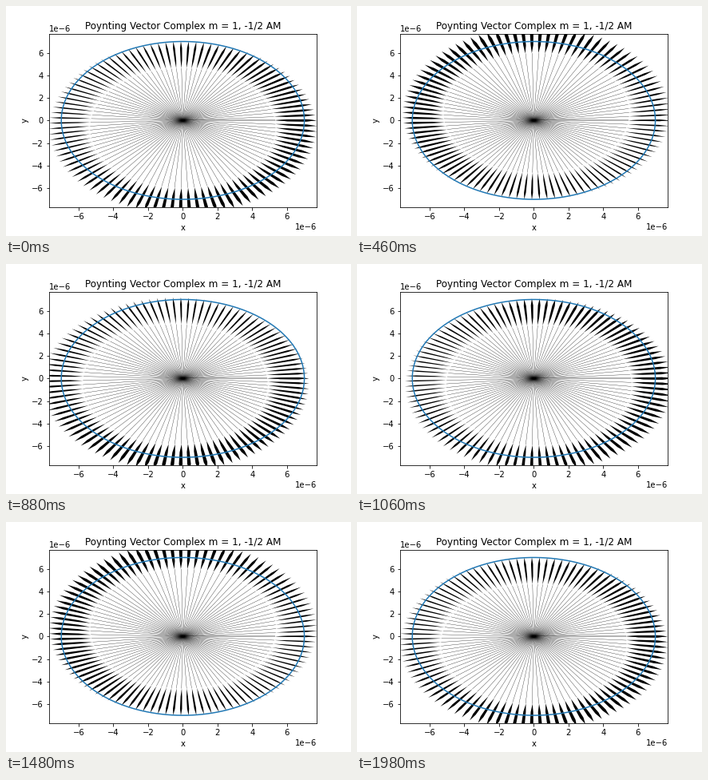
These frames come from a looping animation (432x288 px, 2 s). A matplotlib script:

```python
import numpy as np
import matplotlib.pyplot as plt
from matplotlib.animation import FuncAnimation
from matplotlib.collections import LineCollection, PolyCollection

FRAMES = 100
ARROWS = 100
RADIUS = 7
LIMIT = 7.7
SHAFT, SWING, HEAD = 5.3, 0.68, 2.4

# Head outline: fraction of head length, fraction of half width
ALONG = np.array([0, 0.3, 0.75, 1, 0.75, 0.3])
ACROSS = np.array([0.2, 0.75, 1, 0, -1, -0.75])

plt.rcParams["font.family"] = "DejaVu Sans"
fig, ax = plt.subplots(figsize=(6, 4), dpi=72)
fig.subplots_adjust(left=0.125, right=0.9, bottom=0.125, top=0.88)

theta = np.linspace(0, 2 * np.pi, ARROWS)
radial = np.column_stack([np.cos(theta), np.sin(theta)])
normal = np.column_stack([-np.sin(theta), np.cos(theta)])

shafts = LineCollection([], colors="black", linewidths=0.32, zorder=1)
heads = PolyCollection([], facecolors="black", linewidths=0, zorder=1)
ax.add_collection(shafts, autolim=False)
ax.add_collection(heads, autolim=False)

circle = np.linspace(0, 2 * np.pi, 300)
ax.plot(RADIUS * np.cos(circle), RADIUS * np.sin(circle), color="C0", lw=1.5)

ticks = np.arange(-6, 7, 2)
ax.set(xlim=(-LIMIT, LIMIT), ylim=(-LIMIT, LIMIT), xticks=ticks, yticks=ticks,
       xlabel="x", ylabel="y",
       title="Poynting Vector Complex m = 1, -1/2 AM")


def exponent(corner, shift, align):
    ax.annotate("1e\N{MINUS SIGN}6", corner, shift, xycoords="axes fraction",
                textcoords="offset points", ha=align, va="baseline",
                fontsize=10)


exponent((0, 1), (0, 3), "left")
exponent((1, 0), (0, -28), "right")


def update(i):
    # One lobe travels twice around the circle per loop
    lag = theta + np.pi / 2 - 4 * np.pi * i / (FRAMES - 1)
    base = SHAFT + SWING * np.cos(lag)
    half = 0.078 * (1 + 0.35 * np.cos(lag - np.pi / 4))

    ends = radial * base[:, None]
    shafts.set_segments(np.stack([np.zeros_like(ends), ends], axis=1))

    r = base[:, None] + HEAD * ALONG
    w = half[:, None] * ACROSS
    heads.set_verts(r[..., None] * radial[:, None] + w[..., None] * normal[:, None])
    return shafts, heads


anim = FuncAnimation(fig, update, frames=FRAMES, interval=20, repeat=True,
                     repeat_delay=0, blit=False)
plt.show()
```
